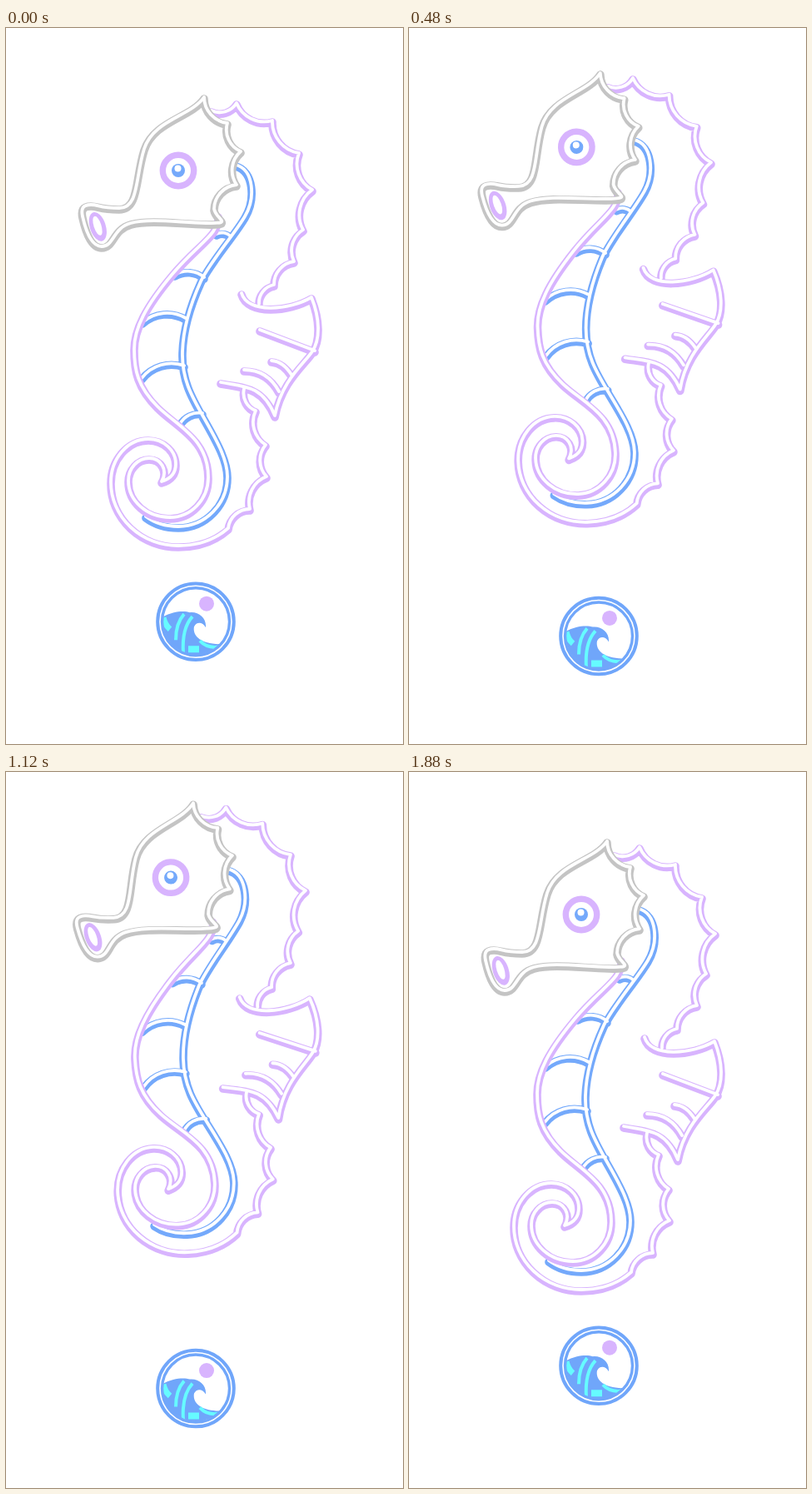
An HTML page that plays this animation: 477x859 px, repeating every 1.92 s.

```html
<!DOCTYPE html>
<html lang="en">
<head>
<meta charset="utf-8">
<title>Seahorse</title>
<style>
html, body { margin: 0; height: 100%; overflow: hidden; background: #fff; }
svg { display: block; width: 477px; height: 859px; }
.line { fill: none; stroke-linecap: round; stroke-linejoin: round; stroke-width: 9.6; }
.shine { stroke: #fff; stroke-width: 3.8; transform: translateY(-2px); }
</style>
</head>
<body>
<svg viewBox="0 0 477 859">
  <g id="horse">
    <g id="lines"></g>
    <circle cx="207" cy="171" r="18.7" fill="none" stroke="#d8b4fe" stroke-width="7.4"/>
    <circle cx="207" cy="171" r="8" fill="#74a9fb"/>
    <circle cx="206.5" cy="168.5" r="4" fill="#fff"/>
    <g transform="translate(110.3 238.3) rotate(-18)">
      <ellipse rx="9.5" ry="18" fill="#d8b4fe"/>
      <ellipse cy="-1" rx="4.5" ry="12" fill="#fff"/>
    </g>
  </g>
  <g id="badge">
    <clipPath id="disc"><circle r="39.5"/></clipPath>
    <g clip-path="url(#disc)">
      <path fill="#70a6fa" d="M-42-4C-28-13-14-13-7-11C4-12 13-4 12 7C8 0 1 0-2 6C-4 16 4 27 30 27L20 42H-42Z"/>
      <g fill="none" stroke="#66fbff" stroke-width="4">
        <path d="M-39-5Q-37 4-31 9" stroke-width="7"/>
        <path d="M-14-9Q-24 2-24 22"/>
        <path d="M-4-6Q-17 8-15 38"/>
        <path d="M-9 33H4" stroke-width="8"/>
        <path d="M5 23Q14 33 30 30"/>
      </g>
    </g>
    <g fill="none" stroke="#70a6fa">
      <circle r="43.3" stroke-width="9"/>
      <circle r="43" stroke="#fff" stroke-width="1.6"/>
    </g>
    <circle cx="13" cy="-21.5" r="9" fill="#d8b4fe"/>
  </g>
</svg>
<script>
const $ = id => document.getElementById(id);

// Chain of arcs from tip to tip; each radius follows from the distance.
function arcs(tips, bend, sweep) {
  const points = tips.split(' ').map(s => s.split(',').map(Number));
  return points.map(([x, y], i) => {
    if (!i) return `M${x},${y}`;
    const [px, py] = points[i - 1], r = bend * Math.hypot(x - px, y - py);
    return `A${r},${r} 0 0 ${sweep} ${x},${y}`;
  }).join('');
}
const scallops = tips => arcs(tips, 0.75, 0);
const rib = ends => arcs(ends, 0.85, 1);

const belly = 'M276,166C298,172 300,206 287,228S244,284 234,306S213,358 212,390' +
  'S222,442 238,470S266,520 266,540A59,60 0 0 1 207,600Q184,600 168,588';
const tail = 'M267,602Q243,623 207,623A81,76 0 0 1 126,547A45,52 0 0 1 171,495' +
  'A33,30 0 0 1 204,525Q204,541 187,546C195,532 186,518 172,518A25,27 0 0 0 147,545' +
  'A50,44 0 0 0 197,589A46,48 0 0 0 243,541';
const throat = 'C243,494 206,480 182,456S154,412 154,387S168,335 200,297S256,250 255,227';
const fin = 'M283,320C290,345 340,341 367,325C377,350 378,375 368,390' +
  'S331,425 323,467C308,430 285,432 258,427';
const finRays = 'M305,364L371,389M319,401Q333,402 343,418M286,412Q314,412 328,438';
const face = 'M238,85C222,108 177,112 166,147S160,218 136,218S112,214 102,214S90,219 92,228' +
  'S100,264 115,264S128,242 150,236S205,235 240,236S252,232 250,219';

const groups = {
  '#74a9fb': [belly, rib('253,249 270,252'), rib('203,298 238,301'), rib('164,355 216,350'),
    rib('163,422 214,407'), rib('209,477 236,464')],
  '#d8b4fe': [
    scallops('247,101 277,92 320,113 352,152 368,196 357,244 346,282 322,310 304,333'),
    scallops('286,435 300,461 312,502 313,540 293,579 267,602'),
    tail + throat, fin, finRays],
  '#c4c4c4': [face, scallops('238,85 266,116 282,150 277,190 250,219')]
};

$('lines').innerHTML = Object.entries(groups).map(([color, shapes]) => {
  const path = `<path d="${shapes.join('')}"/>`;
  return `<g class="line" stroke="${color}">${path}<g class="shine">${path}</g></g>`;
}).join('');

const LOOP = 1920, STEP = 40, PEAK = 900, END = 1880;
const ease = u => u * u * (3 - 2 * u);

function draw(now) {
  const t = Math.floor(now % LOOP / STEP) * STEP;
  const k = ease(t < PEAK ? t / PEAK : (END - t) / (END - PEAK));
  $('horse').setAttribute('transform', `translate(0 ${-52.8 * k}) rotate(${-3 * k} 238 368)`);
  $('badge').setAttribute('transform', `translate(228 ${712.2 + 31.4 * k})`);
}

const start = performance.now();
function tick() {
  draw(performance.now() - start);
  requestAnimationFrame(tick);
}
tick();
</script>
</body>
</html>
```
